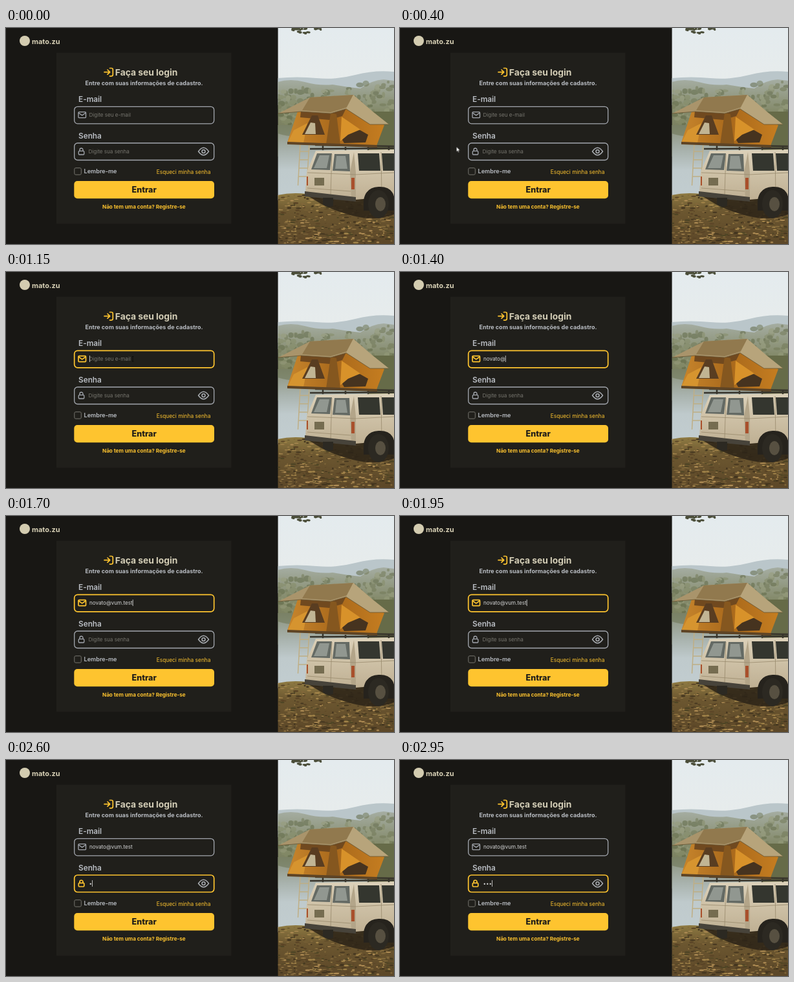
Recreate the animation shown at these times as an HTML page. Size 600 by 336 pixels, loop 3000 ms.

```html
<!DOCTYPE html>
<html lang="pt">
<head>
<meta charset="utf-8">
<title>Login</title>
<style>
  html, body { margin: 0; width: 100%; height: 100%; overflow: hidden; background: #181714; }
  svg { display: block; width: 600px; height: 336px; }
  text { font-family: Inter, "Open Sans", sans-serif; fill: #b9bdc3; }
  .semi { font-weight: 600; }
  .bold { font-weight: 700; }
  .label { font-weight: 600; font-size: 11.8px; }
  .mid { text-anchor: middle; }
  .entry { font-size: 8.1px; }
  .hint { fill: #77766f; }
  .typed { fill: #d3d4d5; }
  .gold { fill: #fec42f; }
  .line { fill: none; stroke: currentColor; stroke-linecap: round; stroke-linejoin: round; }
  .field { color: #a3a7ae; stroke-width: 1.3px; animation: 3s step-end infinite; }
  .field text { stroke: none; }
  #mail { animation-name: focus-mail; }
  #pass { animation-name: focus-pass; }
  #arrow { animation: move 3s linear infinite, show-arrow 3s step-end infinite; }
  #beam { animation: show-beam 3s step-end infinite; }
  @keyframes focus-mail {
    0%, 70% { color: #a3a7ae; stroke-width: 1.3px; }
    31.6% { color: #fec42f; stroke-width: 1.7px; }
  }
  @keyframes focus-pass {
    0% { color: #a3a7ae; stroke-width: 1.3px; }
    70%, 100% { color: #fec42f; stroke-width: 1.7px; }
  }
  @keyframes move {
    0%, 5% { transform: translate(30px, 232px); }
    13.33% { transform: translate(87px, 185px); }
    23.33% { transform: translate(192.5px, 148.5px); }
    28%, 100% { transform: translate(196px, 135px); }
  }
  @keyframes show-arrow { 0%, 28% { opacity: 0; } 5% { opacity: 1; } }
  @keyframes show-beam { 0%, 39.5% { opacity: 0; } 28% { opacity: 1; } }
</style>
</head>
<body>
<svg viewBox="0 0 600 336">
  <defs>
    <linearGradient id="sky" x2="0" y2="1">
      <stop stop-color="#e4ebee"/><stop offset="1" stop-color="#e8eceb"/>
    </linearGradient>
    <linearGradient id="woods" x2="0" y2="1">
      <stop stop-color="#a5ada2"/><stop offset=".4" stop-color="#858b6c"/><stop offset="1" stop-color="#686e4c"/>
    </linearGradient>
    <linearGradient id="lake" x2="0" y2="1">
      <stop stop-color="#8b927c"/><stop offset=".35" stop-color="#a9b3ae"/><stop offset=".6" stop-color="#bfcacc"/><stop offset="1" stop-color="#c2cdd0"/>
    </linearGradient>
    <linearGradient id="soil" x2="0" y2="1">
      <stop stop-color="#8f7b43"/><stop offset=".35" stop-color="#6c5730"/><stop offset="1" stop-color="#5c4728"/>
    </linearGradient>
    <linearGradient id="canvas" x2="1" y2="0">
      <stop stop-color="#c7852c"/><stop offset=".5" stop-color="#a9691c"/><stop offset="1" stop-color="#c57d20"/>
    </linearGradient>
    <linearGradient id="paint" x2="0" y2="1">
      <stop stop-color="#dcd1b9"/><stop offset="1" stop-color="#bfb093"/>
    </linearGradient>
    <clipPath id="frame"><path d="M420.6 0H600V336H420.6z"/></clipPath>
  </defs>

  <path fill="#181714" d="M0 0H421V336H0z"/>
  <path fill="#201f1b" d="M78 38.5H348.5V304.5H78z"/>

  <circle cx="29" cy="20" r="8" fill="#d3ccb0"/>
  <text class="bold" x="40" y="25" font-size="10.9" style="fill:#d8d1b6">mato.zu</text>

  <path class="line" color="#fec42f" stroke-width="1.7" d="M160.500 62.500H163a2.300 2.300 0 0 1 2.300 2.300V72.500a2.300 2.300 0 0 1 -2.300 2.300H160.500M152 68.600H160.500M157 65L160.700 68.600L157 72.200"/>
  <text class="bold" x="168.800" y="73.800" font-size="13.800" style="fill:#d3cdb6">Faça seu login</text>
  <text class="bold mid" x="213.500" y="88.700" font-size="9">Entre com suas informações de cadastro.</text>

  <text class="label" x="112" y="114.800">E-mail</text>
  <g id="mail" class="field">
    <rect class="line" x="105.700" y="122.300" width="216" height="26.500" rx="5"/>
    <g class="line">
      <rect x="112" y="130.700" width="11.500" height="9" rx="1.300"/>
      <path d="M112.300 132L117.700 135.900L123.200 132"/>
    </g>
    <text class="entry hint" x="128.500" y="138">Digite seu e-mail</text>
    <text class="entry typed" x="129" y="138"></text>
  </g>

  <text class="label" x="112" y="171.500">Senha</text>
  <g id="pass" class="field">
    <rect class="line" x="105.700" y="179" width="216" height="26.500" rx="5"/>
    <g class="line">
      <rect x="112.300" y="191.300" width="8.500" height="5.700" rx="1.200"/>
      <path d="M114 191V189.500a2.500 2.500 0 0 1 5 0V191"/>
    </g>
    <text class="entry hint" x="127.500" y="194.800">Digite sua senha</text>
    <text class="entry typed" x="128.500" y="194.800"></text>
  </g>
  <g class="line" color="#a9adb2" stroke-width="1.500">
    <path d="M297.500 192Q305.500 180.500 313.500 192Q305.500 203.500 297.500 192z"/>
    <circle cx="305.500" cy="192" r="2.500"/>
  </g>
  <rect id="caret" width=".8" height="10" fill="#e0e0e0"/>

  <rect x="105.800" y="217.700" width="10.500" height="10.500" rx="2" fill="none" stroke="#77766f"/>
  <text class="semi" x="120.500" y="226.300" font-size="9.100">Lembre-me</text>
  <text class="gold" x="316.500" y="226.500" font-size="8.400" text-anchor="end">Esqueci minha senha</text>
  <rect x="105.300" y="238" width="216.700" height="27.300" rx="5" fill="#fec42f"/>
  <text class="mid" x="213.700" y="256" font-size="12.600" font-weight="800" style="fill:#1d1b18">Entrar</text>
  <text class="bold gold mid" x="213.300" y="280.800" font-size="8.100">Não tem uma conta? Registre-se</text>

  <g clip-path="url(#frame)">
    <path fill="url(#sky)" d="M420 0H600V110H420z"/>
    <path fill="#bac6ca" d="M420 78Q450 75 480 78T540 73T600 68V120H420z"/>
    <path fill="url(#woods)" d="M420 84Q440 78 462 84T505 88L530 92L548 94Q566 81 584 80L600 82V200H420z"/>
    <g id="trees" opacity=".55"></g>
    <path fill="url(#lake)" d="M420 151H600V268H420z"/>
    <path fill="#6b7350" opacity=".5" d="M420 151H470V166Q444 172 420 164z"/>
    <path fill="#666b48" d="M560 130H600V194H560z"/>
    <path fill="url(#soil)" d="M420 260Q442 255 465 258H600V336H420z"/>
    <g id="grass"></g>
    <path fill="#2b2317" opacity=".85" d="M468 262L600 262V290Q575 300 545 294T488 274z"/>
    <g id="leaves" fill="#4a4d38"></g>

    <g fill="none" stroke="#bfae84" stroke-width="1.500">
      <path d="M455 180L451.500 245M469 180L465 246"/>
      <path d="M454.500 192H468M453.800 205H467.300M453 218H466.500M452.200 231H465.700"/>
    </g>

    <path fill="url(#paint)" d="M479 191L600 189V262L541 267L463 256L465 224z"/>
    <path fill="#b3a589" d="M538 193L541 225V266L534 265L532 224z"/>
    <g fill="#646a64">
      <path d="M481 195L504 195L501 221L472 220z"/>
      <path d="M508 196H531L532 223L505 222z"/>
      <path fill="#34362f" d="M544 195H577L579 222H546z"/>
      <path fill="#34362f" d="M581 195H600V222H583z"/>
    </g>
    <path fill="#a9afa8" opacity=".65" d="M485 198H500L496 218H476zM511 199H525L528 219H509z"/>
    <path fill="none" stroke="#98896d" stroke-width=".8" d="M466 225L541 228L600 225M504 196L502 259M580 193L581 260M466 249L533 254"/>
    <path fill="#756c50" d="M477 233H492V245H477z"/>
    <path fill="#a9502c" d="M534 233H539V251H534zM465 231H467V245H465z"/>
    <path fill="#47433a" d="M462 254L541 263V270L462 262z"/>
    <path fill="#26231d" d="M553 268Q556 248 576 247T600 262V284H553z"/>
    <ellipse cx="576" cy="274" rx="16" ry="22" fill="#2c2922"/>
    <ellipse cx="579" cy="274" rx="8" ry="11" fill="#575041"/>
    <path fill="#2c2922" d="M490 264H506V277Q496 280 490 274z"/>

    <path fill="none" stroke="#37342b" stroke-width="2.500" d="M470 188L600 187M478 182L600 184M490 182V190M525 182V190M560 183V190M592 183V190"/>
    <path fill="url(#canvas)" d="M451 130L435 178L500 181L573 183L585 151L532 125z"/>
    <path fill="#d6942f" d="M445 159L436 177L460 179L466 148z"/>
    <path fill="#70491f" d="M456 129L502 132L526 125L520 137L500 143L455 139z"/>
    <path fill="#593d21" d="M473 136L458 166H493L482 136z"/>
    <path fill="#c1b594" d="M471 147L462 165H479L478 148z"/>
    <path fill="#85571f" d="M502 132L495 181L517 182L511 134z"/>
    <path fill="#46331f" d="M520 174Q528 156 546 158L560 166L556 178L523 179z"/>
    <path fill="#d8922a" d="M519 138L548 158L529 166L517 176z"/>
    <path fill="#5e4425" d="M435 177L574 182V186L435 181z"/>
    <path fill="#a9946b" d="M421 133L470 108L537 104L567 130L592 150L563 150L526 126L502 133L456 130z"/>
    <path fill="#91794e" d="M470 108L537 104L528 123L502 131L458 128z"/>
    <path fill="#b7a47b" d="M537 104L567 130L592 150L563 150L526 125z"/>
    <path fill="none" stroke="#665331" stroke-width=".8" d="M421 133L456 130L502 133L526 126L563 150H592"/>
  </g>

  <g id="arrow">
    <path fill="#fff" stroke="#2a2926" stroke-width=".5" d="M0 0V7.500L1.700 6L2.900 8.700L4 8.200L2.900 5.600H5.200z"/>
  </g>
  <path id="beam" fill="none" stroke="#090908" stroke-width=".8" d="M194.800 131.500H197.200M196 131.500V139M194.800 139H197.200"/>
</svg>
<script>
  const LOOP = 3000;
  const EMAIL = "novato@vum.test";
  const $ = id => document.getElementById(id);

  let seed = 17;
  const rnd = () => (seed = seed * 16807 % 2147483647) / 2147483647;

  function dot(parent, x, y, rx, ry, fill) {
    const e = document.createElementNS("http://www.w3.org/2000/svg", "ellipse");
    const attrs = { cx: x, cy: y, rx, ry, ...(fill && { fill }) };
    for (const k in attrs) e.setAttribute(k, attrs[k]);
    parent.append(e);
  }

  const greens = ["#737a58", "#979d7c", "#626a48", "#868d69"];
  for (let i = 0; i < 200; i++) {
    const x = 420 + rnd() * 180;
    const top = x > 545 ? 84 : 94;
    dot($("trees"), x, top + rnd() * (150 - top), 2 + rnd() * 4, 2 + rnd() * 3, greens[i % greens.length]);
  }

  const soils = ["#a3854a", "#43351f", "#80673a", "#4f4525", "#b08d55", "#5a4426"];
  for (let i = 0; i < 520; i++) {
    const y = 260 + rnd() * 76;
    dot($("grass"), 420 + rnd() * 180, y, 1 + rnd() * 3.5, .4 + rnd(), soils[i % soils.length]);
  }

  for (let i = 0; i < 26; i++) {
    const x = 442 + rnd() * 46;
    dot($("leaves"), x, rnd() * (x > 452 && x < 472 ? 9 : 5), 1.5 + rnd() * 2, 1 + rnd());
  }

  const parts = id => [$(id).querySelector(".hint"), $(id).querySelector(".typed")];
  const mail = parts("mail"), pass = parts("pass");

  function fill([hint, typed], value) {
    if (typed.textContent !== value) typed.textContent = value;
    hint.style.display = value ? "none" : "";
  }

  // Characters entered by time t, one per step from start
  const count = (t, start, step, max) =>
    Math.max(0, Math.min(max, Math.floor((t - start) / step) + 1));

  function draw(now) {
    const t = now % LOOP;
    fill(mail, EMAIL.slice(0, count(t, 1200, 32, EMAIL.length)));
    fill(pass, "•".repeat(count(t, 2480, 150, 3)));

    const onPass = t >= 2100;
    const typed = (onPass ? pass : mail)[1];
    const width = typed.textContent ? typed.getComputedTextLength() : 0;
    const caret = $("caret");
    caret.style.display = t >= 950 ? "" : "none";
    caret.setAttribute("x", +typed.getAttribute("x") + width);
    caret.setAttribute("y", onPass ? 187 : 130);
    requestAnimationFrame(draw);
  }
  requestAnimationFrame(draw);
</script>
</body>
</html>
```
